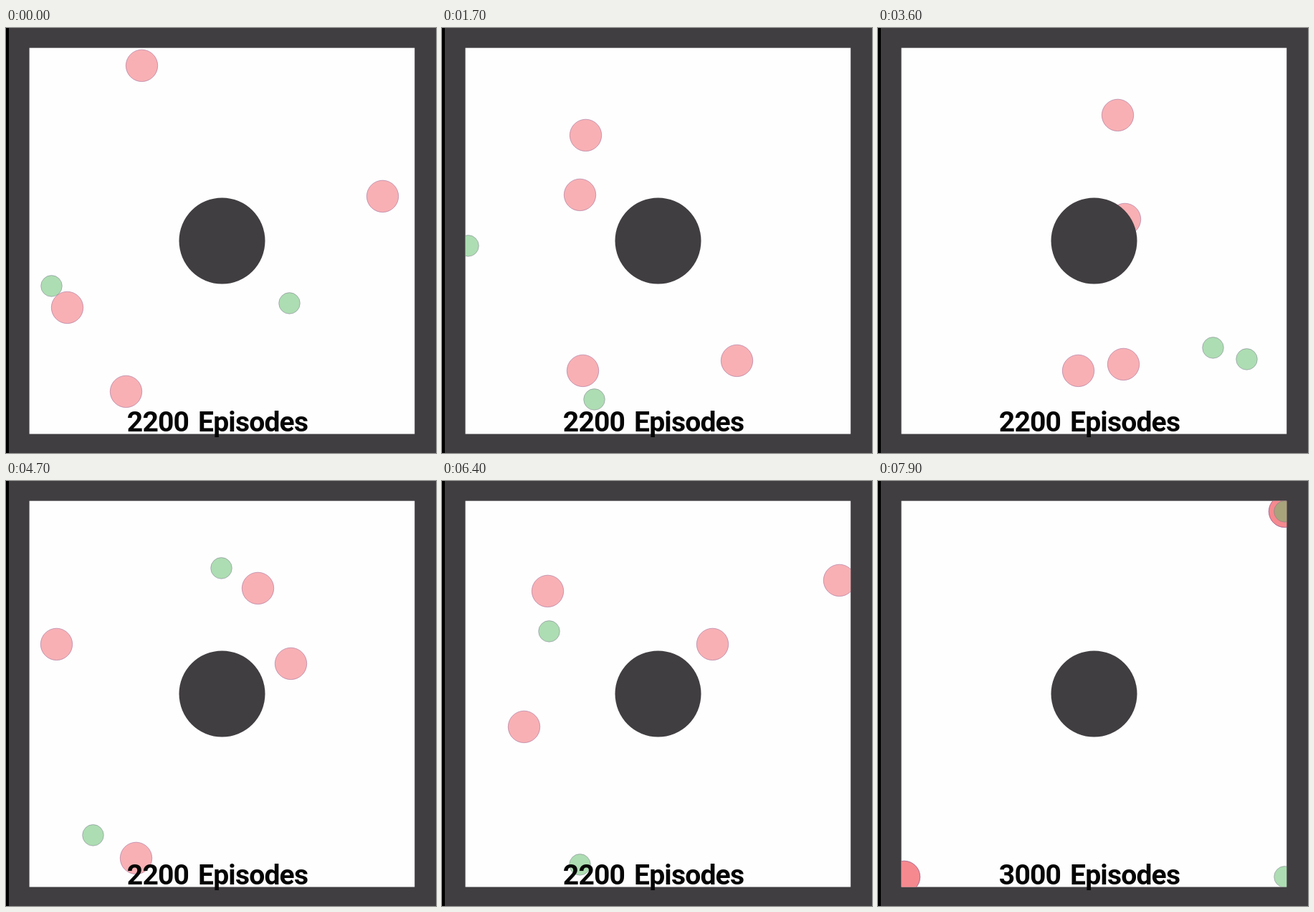
An HTML page with a canvas that plays this animation: 600x592 px, repeating every 8000 ms.

```html
<!DOCTYPE html>
<html lang="en">
<head>
<meta charset="utf-8">
<title>Pursuit and evasion</title>
<style>
  html, body { margin: 0; width: 100%; height: 100%; overflow: hidden; background: #000; }
  canvas { display: block; }
</style>
</head>
<body>
<canvas id="stage" width="600" height="592"></canvas>
<script>
const ctx = document.getElementById('stage').getContext('2d');
const LOOP = 8000, STEP = 100, CAPTION_CHANGE = 7600, SWING = 45;
const WALL = '#413e41';
const arena = { x: 32.6, y: 27.7, w: 537.6, h: 537.8 };
const hub = { x: 301.5, y: 296.5, r: 60 };

// Every agent reaches its next stop at the same moment.
const times = [0, 1700, 2800, 3600, 4700, 6400, 7900];
const chasers = [
  [[189, 52], [200, 149], [296, 98], [334, 121], [351, 149], [554, 138], [506, 545]],
  [[525, 234], [411, 463], [437, 324], [344, 266], [397, 254], [377, 227], [313, 135]],
  [[85, 389], [192, 232], [106, 331], [279, 477], [181, 525], [114, 342], [333, 389]],
  [[167, 506], [196, 477], [181, 442], [342, 468], [70, 227], [147, 153], [191, 158]]
];
const runners = [
  [[63, 359], [36, 303], [331, 253], [467, 445], [121, 493], [192, 534], [361, 321]],
  [[395, 383], [212, 517], [350, 138], [514, 461], [300, 121], [149, 209], [503, 240]]
];

const clamp = (n, low, high) => Math.min(Math.max(n, low), high);

// Catmull-Rom curve between stops, swung outwards around the hub.
function position(stops, t) {
  const last = times.length - 1;
  const i = clamp(times.findIndex(time => time > t) - 1, 0, last - 1);
  const u = (t - times[i]) / (times[i + 1] - times[i]);
  const [a, b, c, d] = [-1, 0, 1, 2].map(k => stops[clamp(i + k, 0, last)]);
  const [x, y] = [0, 1].map(n => b[n] + u / 2 * (c[n] - a[n]
    + u * (2 * a[n] - 5 * b[n] + 4 * c[n] - d[n]
    + u * (3 * (b[n] - c[n]) + d[n] - a[n]))));
  const angle = Math.atan2(y - hub.y, x - hub.x);
  const swing = SWING * Math.sin(Math.PI * u) ** 2;
  return [
    clamp(x + swing * Math.cos(angle), 36, 567) + .5,
    clamp(y + swing * Math.sin(angle), 42, 551) + .4
  ];
}

function disc(x, y, r, fill, line) {
  ctx.beginPath();
  ctx.arc(x, y, r, 0, Math.PI * 2);
  ctx.fillStyle = fill;
  ctx.fill();
  if (line) {
    ctx.strokeStyle = line;
    ctx.stroke();
  }
}

function box(x, y, w, h, fill) {
  ctx.fillStyle = fill;
  ctx.fillRect(x, y, w, h);
}

function draw(t) {
  box(0, 0, 600, 592, '#000');
  box(4, 0, 596, 592, WALL);
  box(arena.x, arena.y, arena.w, arena.h, '#fefefe');

  ctx.save();
  ctx.beginPath();
  ctx.rect(arena.x, arena.y, arena.w, arena.h);
  ctx.clip();
  for (const stops of chasers)
    disc(...position(stops, t), 22.2, 'rgba(243,100,108,.5)', 'rgba(150,90,140,.5)');
  for (const stops of runners)
    disc(...position(stops, t), 14.8, 'rgba(95,190,105,.5)', 'rgba(120,110,140,.45)');
  ctx.restore();

  disc(hub.x, hub.y, hub.r, WALL);
  ctx.fillStyle = '#050505';
  ctx.font = 'bold 39px Roboto, "Open Sans", sans-serif';
  ctx.letterSpacing = '-0.8px';
  ctx.wordSpacing = '4px';
  ctx.textAlign = 'center';
  ctx.fillText(`${t < CAPTION_CHANGE ? 2200 : 3000} Episodes`, 295, 562);
}

function frame() {
  draw(Math.floor(performance.now() % LOOP / STEP) * STEP);
  requestAnimationFrame(frame);
}
frame();
</script>
</body>
</html>
```
